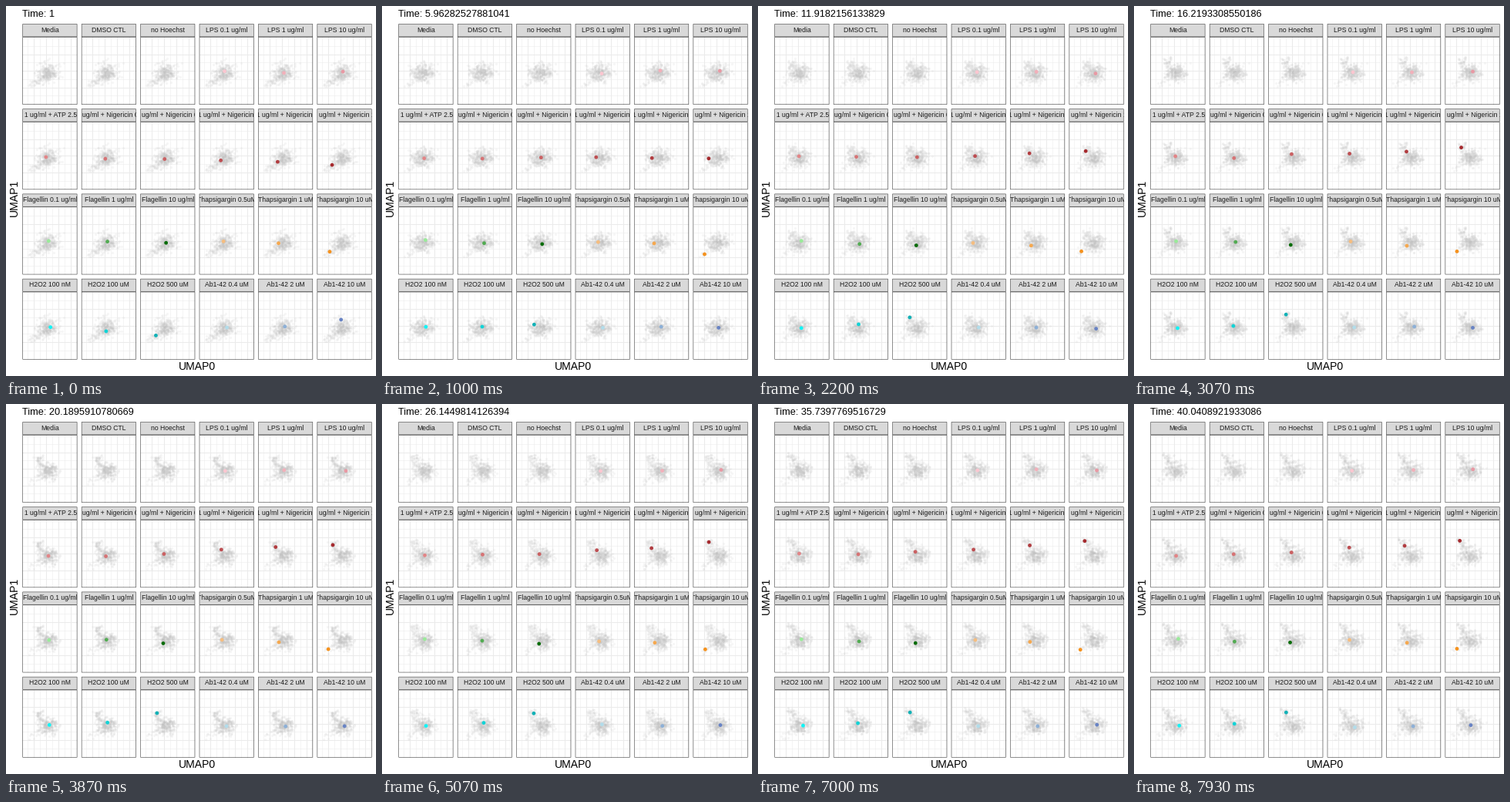
These frames come from a looping animation (480x480 px, 8 s). A matplotlib script:

```python
import numpy as np
import matplotlib.pyplot as plt
from matplotlib.animation import FuncAnimation
from matplotlib.collections import LineCollection
from matplotlib.colors import to_rgb
from matplotlib.patches import Rectangle

plt.rcParams.update({"font.family": "Liberation Sans", "toolbar": "None"})

SIZE, DPI = 480, 72
FRAMES, LOOP_MS = 120, 8000
LEFT, TOP, RIGHT, BOTTOM, GAP = 21.45, 23.2, 474.5, 458.55, 5.5
COLS, ROWS, STRIP = 6, 4, 16.9
WIDTH = (RIGHT - LEFT + GAP) / COLS - GAP
HEIGHT = (BOTTOM - TOP + GAP) / ROWS - GAP - STRIP
WELLS = 13
CORE = np.array([35, 46])

hours = 1 + 89 * np.arange(FRAMES) / 269
rng = np.random.default_rng(12)

fig = plt.figure(figsize=(SIZE / DPI, SIZE / DPI), dpi=DPI, facecolor="white")
ax = fig.add_axes([0, 0, 1, 1])
ax.set_xlim(0, SIZE)
ax.set_ylim(SIZE, 0)
ax.axis("off")


def frame(x, y, w, h, fill):
    """Filled box whose thin border lies just inside its edge."""
    lw = 0.54
    ax.add_patch(Rectangle((x + lw / 2, y + lw / 2), w - lw, h - lw, fc=fill,
                           ec="#333333", lw=lw, snap=False, zorder=5))


def draw_grid(x, y):
    def lines(xs, ys, lw):
        segs = [[(x + a, y), (x + a, y + HEIGHT)] for a in xs]
        segs += [[(x, y + b), (x + WIDTH, y + b)] for b in ys]
        ax.add_collection(LineCollection(segs, colors="#ebebeb", linewidths=lw, zorder=1))

    lines(np.arange(6.5, WIDTH, 16), np.arange(11.75, HEIGHT, 21.5), 0.54)
    lines(np.arange(14.5, WIDTH, 16), np.arange(22.5, HEIGHT - 5, 21.5), 1.07)


def draw_panel(index, label):
    row, col = divmod(index, COLS)
    x = LEFT + col * (WIDTH + GAP)
    top = TOP + row * (STRIP + HEIGHT + GAP)
    draw_grid(x, top + STRIP)
    frame(x, top, WIDTH, STRIP, "#d9d9d9")
    frame(x, top + STRIP, WIDTH, HEIGHT, "none")
    text = ax.text(x + WIDTH / 2, top + 10.6, label, size=8.6, color="#1a1a1a",
                   ha="center", va="baseline", zorder=6, clip_on=True)
    text.set_clip_path(Rectangle((x, top), WIDTH, STRIP, transform=ax.transData))
    return x, top + STRIP


origins, colors, means = [], [], []


def family(labels, pale, deep, weak, start, end, tau=10):
    """A dose series: stronger doses leave the weak pose and settle from start to end."""
    weak, start, end = map(np.array, (weak, start, end))
    pale, deep = np.array(to_rgb(pale)), np.array(to_rgb(deep))
    left = np.exp(-(hours - 1) / tau)[:, None]
    for u, label in zip(np.linspace(0, 1, len(labels)), labels):
        origins.append(draw_panel(len(origins), label))
        colors.append(pale + (deep - pale) * u)
        means.append(weak + u ** 2 * (end + (start - end) * left - weak))


def doses(name, *amounts):
    return [f"{name} {a}" for a in amounts]


family(["Media", "DMSO CTL", "no Hoechst"], "#cccccc", "#d0d0d0",
       (34.5, 46), (34, 46), (34, 46))
family(doses("LPS", "0.1 ug/ml", "1 ug/ml", "10 ug/ml"), "#fbc6d0", "#e899a4",
       (33.5, 46), (33.5, 44.5), (37, 46))
family(["LPS 1 ug/ml + ATP 2.5 mM"]
       + doses("LPS 1 ug/ml + Nigericin", "0.1 uM", "0.5 uM", "1 uM", "3 uM", "10 uM"),
       "#e28587", "#a52a2e", (32.5, 45.5), (20, 56), (20, 24), tau=13)
family(doses("Flagellin", "0.1 ug/ml", "1 ug/ml", "10 ug/ml"), "#9aea9a", "#0a6c0a",
       (34.5, 45), (32.5, 48.5), (30, 50))
family(["Thapsigargin 0.5uM", "Thapsigargin 1 uM", "Thapsigargin 10 uM"],
       "#f5bd80", "#f5921e", (30.5, 45.5), (16.5, 58.5), (15, 58.5))
family(doses("H2O2", "100 nM", "100 uM", "500 uM"), "#12f4f6", "#12b1b6",
       (36, 46.5), (19.7, 57.3), (23, 29), tau=6)
family(doses("Ab1-42", "0.4 uM", "2 uM", "10 uM"), "#b2dcea", "#6883c4",
       (34.8, 46.5), (31.5, 38.3), (35.8, 47), tau=4)

origins = np.array(origins)
means = np.array(means)
count = len(origins)


def at_hour(table, t):
    """Linear blend between hourly rows."""
    i = int(t) - 1
    return table[i] + (table[i + 1] - table[i]) * (t - 1 - i)


# Each mean wobbles from hour to hour; wells scatter around it and drift.
wobble = rng.normal(0, 1.1, (42, count, 2))
home = rng.normal(0, 1, (count, WELLS, 2)) * (6, 4.6)
drift = rng.normal(0, 1, (42, count, WELLS, 2)) * (3.8, 3.4)
along = rng.normal(0, 1, (count, WELLS, 1))


def mean_at(k):
    return means[:, k] + at_hour(wobble, hours[k])


def cloud_at(k):
    # Groups far from the core are tighter; low ones stretch along the tail.
    mean = mean_at(k)
    far = np.clip((np.hypot(*(mean - CORE).T) - 8) / 8, 0, 1)[:, None, None]
    low = np.clip((mean[:, 1] - 46) / 8, 0, 1)[:, None, None]
    off = (home + at_hour(drift, hours[k])) * (1 - 0.6 * far)
    off = off + far * low * along * (6.5, -4.5)
    points = np.clip(mean[:, None] + off, (8, 23), (54, 64)).reshape(-1, 2)
    return (origins[:, None] + points).reshape(-1, 2)


cloud, = ax.plot([], [], "o", ms=3.2, mew=0, color="#bebebe", alpha=0.13, zorder=2)
dots = ax.scatter(*origins.T, s=4.8 ** 2, c=colors, linewidths=0, zorder=3)
title = ax.text(21.2, 14, "", size=12.8, color="black", va="baseline")
ax.text(248, 472, "UMAP0", size=14, ha="center", va="baseline")
ax.text(15, 249, "UMAP1", size=14, rotation=90, rotation_mode="anchor",
        ha="center", va="baseline")


def update(k):
    title.set_text(f"Time: {hours[k]:.15g}")
    cloud.set_data(*cloud_at(k).T)
    dots.set_offsets(origins + mean_at(k))
    return cloud, dots, title


anim = FuncAnimation(fig, update, frames=FRAMES, interval=LOOP_MS / FRAMES,
                     repeat=True, repeat_delay=0)
plt.show()
```
